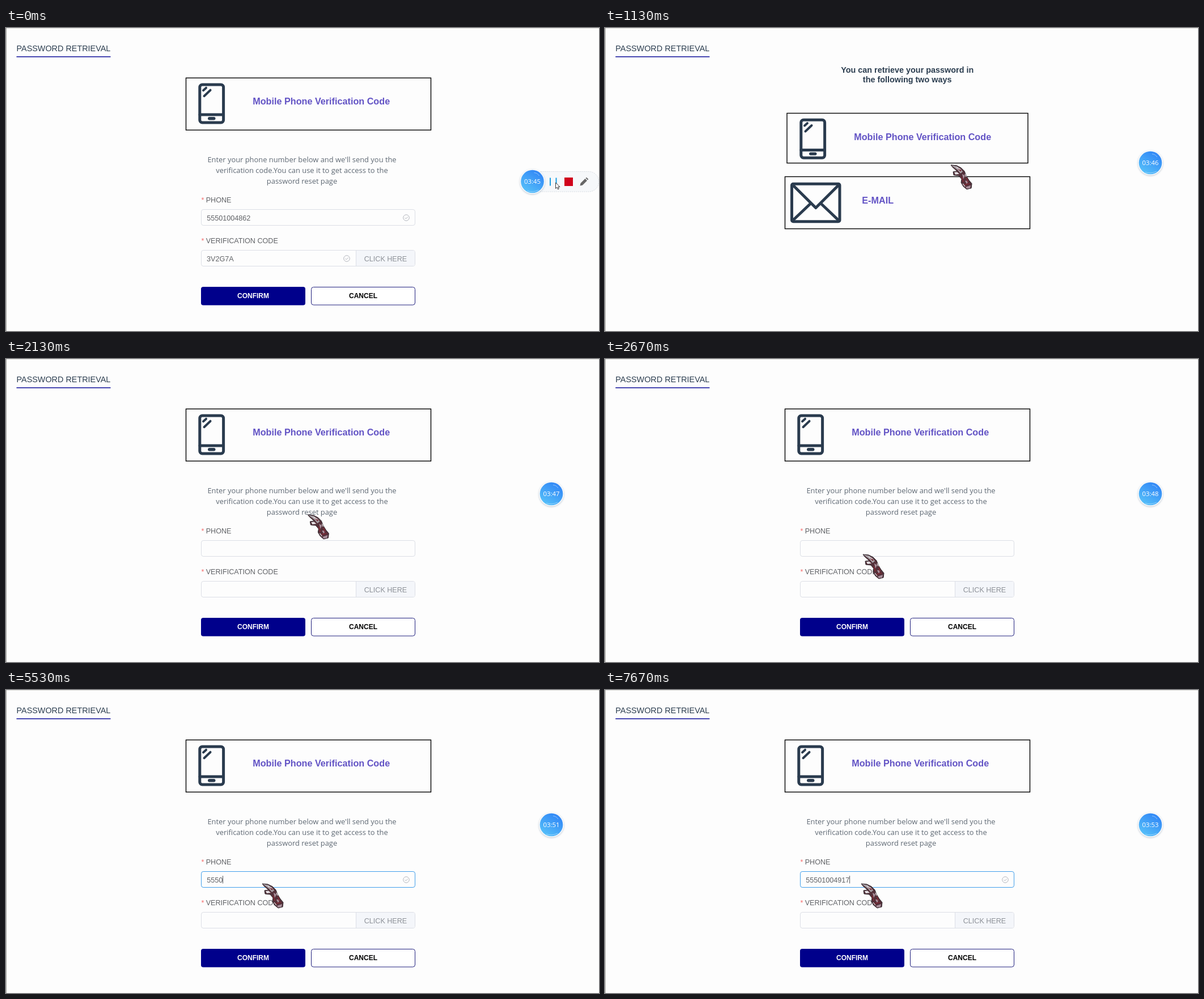
An HTML page for the animation above (8000 ms loop, 1046 by 535 pixels).

```html
<!DOCTYPE html>
<html lang="en">
<head>
<meta charset="utf-8">
<title>Password retrieval</title>
<style>
  html, body { margin: 0; width: 100%; height: 100%; overflow: hidden; background: #fdfdfd; }
  svg { display: block; width: 1046px; height: 535px; }
  text { font-family: "Liberation Sans", Arial, sans-serif; font-size: 12.6px; fill: #606266; }
  .title { font-size: 14.4px; fill: #2c3e50; }
  .heading { font-size: 14.4px; font-weight: bold; fill: #2c3e50; text-anchor: middle; }
  .method { font-size: 16.2px; font-weight: bold; fill: #6354c5; }
  .hint { font-family: "Open Sans", "Noto Sans", sans-serif; font-size: 12.9px; fill: #5f6974; text-anchor: middle; }
  .button { font-size: 12px; font-weight: bold; text-anchor: middle; }
  .clock { font-family: "Open Sans", "Noto Sans", sans-serif; font-size: 11.4px; fill: #fff; text-anchor: middle; }
  .star { fill: #f56c6c; }
  .field { fill: #fdfdfd; stroke: #dcdfe6; }
  .card { fill: none; stroke: #000; stroke-width: 1.4; }
  .icon { fill: none; stroke: #2a3b4e; stroke-width: 5; stroke-linejoin: round; stroke-linecap: round; }
  .tick { fill: none; stroke: #b4b7be; }
</style>
</head>
<body>
<svg viewBox="0 0 1046 535">
  <defs>
    <linearGradient id="blue" x1="0.15" y1="1" x2="0.8" y2="0">
      <stop offset="0" stop-color="#58c4f9"/>
      <stop offset="1" stop-color="#2f83f6"/>
    </linearGradient>
    <filter id="shadow" x="-30%" y="-30%" width="160%" height="160%">
      <feDropShadow dx="0" dy="1" stdDeviation="1.6" flood-color="#6d8299" flood-opacity=".45"/>
    </filter>
    <g id="okMark" class="tick">
      <circle r="5.3"/>
      <path d="M-2.6 0 L-.6 2 L2.7 -1.6"/>
    </g>
  </defs>

  <rect width="1046" height="535" fill="#fdfdfd"/>
  <path d="M0 .5H1046" stroke="#dededb"/>
  <path d="M.5 0V535" stroke="#a6a6a0"/>
  <text class="title" x="18.5" y="41">PASSWORD RETRIEVAL</text>
  <path d="M18.5 50.8H184.5" stroke="#10109a" stroke-width="1.6"/>

  <g id="phoneCard">
    <rect class="card" id="phoneFrame" x="317.5" y=".5" width="432" height="92"/>
    <g id="phoneBody">
      <rect class="icon" x="341.8" y="12.3" width="41.8" height="67" rx="4.5"/>
      <path class="icon" d="M342 65.4H383"/>
      <path class="icon" stroke-width="4" d="M348 22.5L353 18M349.5 32.5L360.5 22" style="stroke-width:4"/>
      <rect x="356" y="69.4" width="13.5" height="5.4" rx="2.7" fill="#2a3b4e"/>
      <text class="method" x="435.2" y="47.7">Mobile Phone Verification Code</text>
    </g>
  </g>

  <g id="choice">
    <text class="heading" x="533.2" y="79.3">You can retrieve your password in</text>
    <text class="heading" x="533.2" y="95.8">the following two ways</text>
    <g id="mailCard">
      <rect class="card" x="317.5" y=".5" width="432" height="92"/>
      <rect class="icon" x="329.5" y="13.2" width="84.5" height="66.5" rx="2.5"/>
      <path class="icon" d="M331 15L371.8 55.5L412.5 15M331 78L361 49.5M412.5 78L382.5 49.5"/>
      <text class="method" x="453.3" y="47.7">E-MAIL</text>
    </g>
  </g>

  <g id="form">
    <text class="hint" x="522" y="237">Enter your phone number below and we'll send you the</text>
    <text class="hint" x="522" y="256">verification code.You can use it to get access to the</text>
    <text class="hint" x="522" y="275.3">password reset page</text>

    <text class="star" x="344.5" y="307.7">*</text>
    <text x="352.7" y="307.7">PHONE</text>
    <rect class="field" id="phoneField" x="344.5" y="320.5" width="377" height="28" rx="3.6"/>
    <text id="phone" x="354.3" y="339.7"></text>
    <path id="caret" d="M0 328V341.5" stroke="#55585e"/>
    <use href="#okMark" id="phoneOk" x="706" y="335"/>

    <text class="star" x="344.5" y="379.7">*</text>
    <text x="352.7" y="379.7">VERIFICATION CODE</text>
    <rect class="field" x="344.5" y="392.5" width="377" height="28" rx="3.6"/>
    <path d="M617.5 393H718Q721 393 721 396V417Q721 420 718 420H617.5Z" fill="#f4f6fa"/>
    <path d="M617.5 393V420" stroke="#dcdfe6"/>
    <text x="631.7" y="411.7" style="fill:#8d9198">CLICK HERE</text>
    <g id="codeFilled">
      <text x="354" y="411.7">3V2G7A</text>
      <use href="#okMark" x="601" y="407"/>
    </g>

    <rect x="344" y="457" width="184" height="32.5" rx="4" fill="#00008b"/>
    <text class="button" x="436" y="477.4" style="fill:#fff">CONFIRM</text>
    <rect x="538.5" y="457.5" width="183" height="31.5" rx="4" fill="#fff" stroke="#20207e"/>
    <text class="button" x="630" y="477.4" style="fill:#000">CANCEL</text>
  </g>

  <g id="panel">
    <path d="M929 253.5H1028A17.7 17.7 0 0 1 1028 289H929Z" fill="#f6f8fa" stroke="#d5dae0" stroke-dasharray="2 1.5"/>
    <path d="M960 264.5V278.5M970.5 264.5V278.5" stroke="#1c9fe2" stroke-width="2"/>
    <rect x="985" y="264" width="15" height="15" fill="#d0021b"/>
    <path d="M1012.5 278.5L1013.5 274L1021.5 266L1025 269.5L1017 277.5ZM1022.5 265L1024 263.8L1027.3 267L1026 268.5Z" fill="#666"/>
  </g>
  <g id="ball">
    <circle r="22" fill="#f4f8fc" filter="url(#shadow)"/>
    <circle r="20.3" fill="url(#blue)"/>
    <path d="M3 -15.5Q9 -15 12 -10M-9 16.5Q1 20 11 15" fill="none" stroke="#c5e4ff" stroke-width=".8" opacity=".75"/>
    <text class="clock" id="clock" y="4.1"></text>
  </g>

  <path id="arrow" d="M969.5 273V283.4L971.9 281.2L973.5 284.8L975.3 284L973.8 280.6H977Z" fill="#fff" stroke="#222" stroke-width=".9"/>
  <g id="hand" stroke-linejoin="round">
    <path d="M0 0L10 1L18 5L24 11L27 19L32 27L37 33L36 41L28 43L22 38L18 31L19 25L14 19L5 18L4 12L11 11L3 4Z" fill="#54313a" stroke="#2e262c"/>
    <path d="M1 .6L10 2.2L17 6.5L21 12L17 15L12 9Z" fill="#aaa5aa"/>
    <path d="M6 13L11 12.5L15 16L8 17Z" fill="#e4e0e3"/>
    <path d="M20 16L25 19L22 25ZM25 28L31 28L28 34ZM26 39L35 36L34 41L28 42Z" fill="#aa919d"/>
    <path d="M13 6L18 11M19 21L22 30M28 23L30 30M24 35L33 33" fill="none" stroke="#792b36" stroke-width="2.2"/>
    <path d="M10 4L16 8M21 33L25 38M25 16L27 21" fill="none" stroke="#e8e3e6" stroke-width="1.2"/>
  </g>
</svg>

<script>
const LOOP = 8000;
const CUT = 130, OPEN_FORM = 1730, FOCUS = 3000, BLINK = 533;
const OLD_NUMBER = "55501004862", NEW_NUMBER = "55501004917";
const DIGIT_WIDTH = 7.008;

const keyTimes = [4600, 4800, 5000, 5530, 5730, 5930, 6270, 6670, 6930, 7600, 7670];
const clockTicks = [470, 1470, 2470, 3470, 4470, 5530, 6470, 7600];
const handPath = [
  [130, 940, 277], [800, 625, 246], [930, 620, 246], [1530, 582, 230],
  [1730, 582, 230], [2670, 455, 345], [2870, 455, 345], [3000, 452, 342]
];

const ui = Object.fromEntries([...document.querySelectorAll("[id]")].map(el => [el.id, el]));
const show = (el, visible) => { el.style.display = visible ? "" : "none"; };
const move = (el, x, y) => el.setAttribute("transform", `translate(${x} ${y})`);
const clamp = v => Math.min(1, Math.max(0, v));
const ease = v => v * v * (3 - 2 * v);
const mix = (a, b, k) => a + (b - a) * k;
const passed = (times, t) => times.filter(time => time <= t).length;

function handAt(t) {
  const next = handPath.findIndex(point => point[0] > t);
  if (next < 0) return handPath.at(-1).slice(1);
  if (next === 0) return handPath[0].slice(1);
  const [t0, x0, y0] = handPath[next - 1], [t1, x1, y1] = handPath[next];
  const k = ease((t - t0) / (t1 - t0));
  return [mix(x0, x1, k), mix(y0, y1, k)];
}

function drawCards(choosing, hover) {
  const inset = hover ? 3.5 : 0;
  move(ui.phoneCard, 0, choosing ? 150 : 87.7);
  move(ui.phoneBody, hover ? 4 : 0, 0);
  ui.phoneFrame.setAttribute("x", 317.5 + inset);
  ui.phoneFrame.setAttribute("width", 432 - 2 * inset);
  ui.phoneFrame.setAttribute("height", hover ? 88 : 92);
  move(ui.mailCard, 0, hover ? 262 : 266);
}

function drawForm(t) {
  const filled = t < CUT;
  const typed = passed(keyTimes, t);
  const focus = clamp((t - FOCUS) / 270);
  const blinkOn = Math.floor((t - FOCUS) / BLINK) % 2 === 0;

  ui.phone.textContent = filled ? OLD_NUMBER : NEW_NUMBER.slice(0, typed);
  ui.phoneField.style.stroke =
    `rgb(${mix(220, 64, focus)},${mix(223, 158, focus)},${mix(230, 235, focus)})`;
  show(ui.phoneOk, filled || typed > 0);
  show(ui.codeFilled, filled);
  show(ui.caret, t >= FOCUS && (typed > 0 || blinkOn));
  move(ui.caret, 354.5 + typed * DIGIT_WIDTH, 0);
}

function drawRecorder(t) {
  const k = ease(clamp((t - CUT) / 200));
  show(ui.panel, t < CUT);
  move(ui.ball, mix(928.5, 962, k), mix(271, 238, k));
  ui.clock.textContent = `03:${45 + passed(clockTicks, t)}`;
}

function draw(t) {
  const choosing = t >= CUT && t < OPEN_FORM;
  const [x, y] = handAt(t);
  show(ui.choice, choosing);
  show(ui.form, !choosing);
  show(ui.arrow, t < CUT);
  show(ui.hand, t >= CUT);
  move(ui.hand, x, y);
  drawCards(choosing, choosing && x < 750 && y < 243);
  drawForm(t);
  drawRecorder(t);
}

const start = performance.now();
function tick() {
  draw((performance.now() - start) % LOOP);
  requestAnimationFrame(tick);
}
tick();
</script>
</body>
</html>
```
